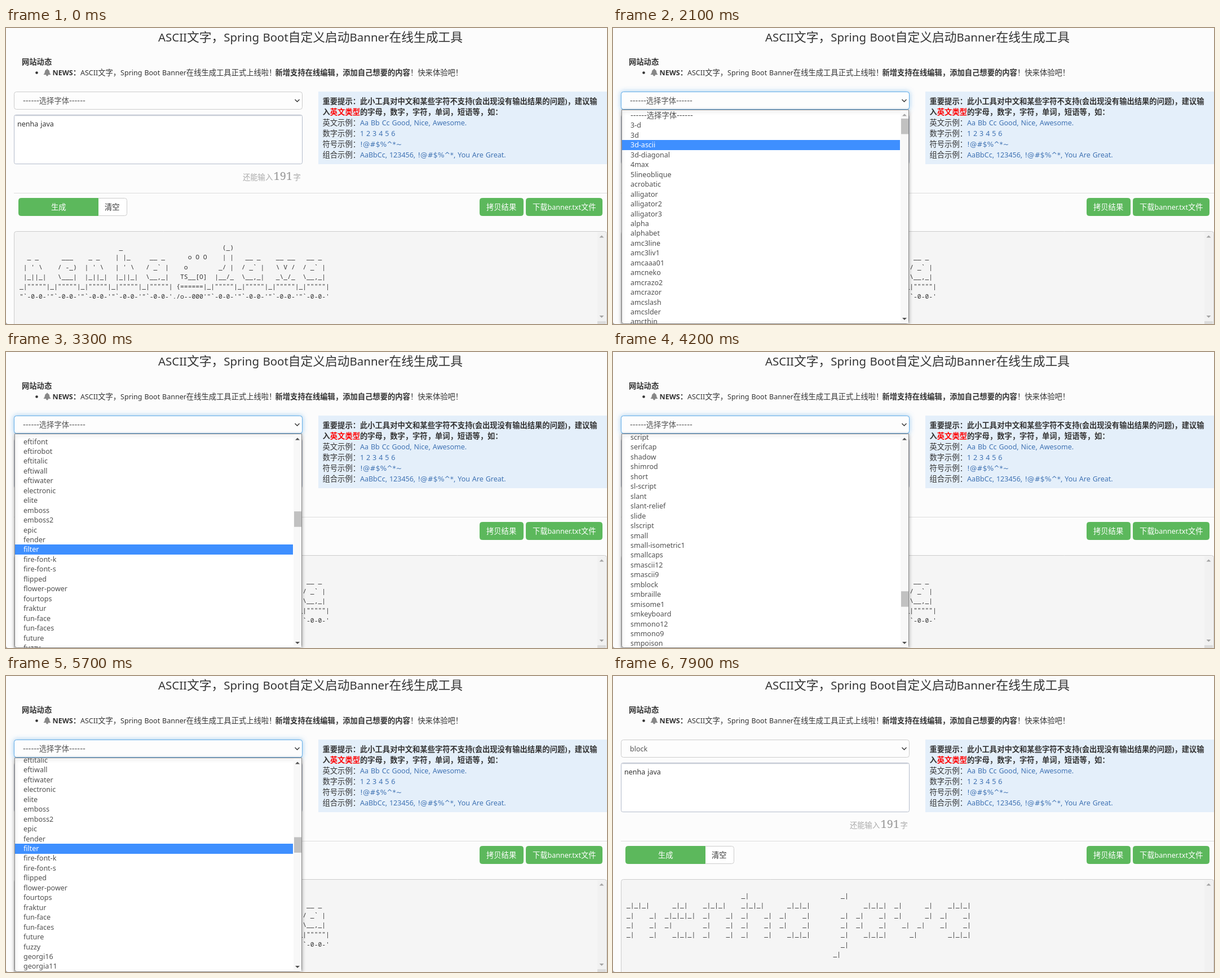
Write an HTML page with a canvas that moves like this. It is 1066 px wide and 526 px high and loops after 8000 ms.

```html
<!DOCTYPE html>
<html lang="zh-CN">
<head>
<meta charset="utf-8">
<title>Banner</title>
<style>
html, body { margin: 0; width: 100%; height: 100%; overflow: hidden; background: #fcfcfc; }
canvas { display: block; }
</style>
</head>
<body>
<canvas id="stage" width="1066" height="526"></canvas>
<script>
const ctx = document.getElementById('stage').getContext('2d');
const LOOP = 8000, STEP = 100, SIZE = 13.3;
const INK = '#333', LINK = '#3f72b3', GREEN = '#5cb85c', GREEN_HOVER = '#449d44';
const NAME = 'nenha java';
const PROMPT = '------选择字体------';

const fonts = [PROMPT, ...`3-d 3d 3d-ascii 3d-diagonal 4max 5lineoblique acrobatic alligator alligator2
alligator3 alpha alphabet amc3line amc3liv1 amcaaa01 amcneko amcrazo2 amcrazor amcslash amcslder amcthin
amctubes amcun1 arrows ascii-new-roman avatar b1ff banner banner3 banner3-d banner4 barbwire basic bear bell
benjamin big big-money-ne big-money-nw big-money-se big-money-sw bigascii12 bigascii9 bigchief bigfig bigmono12
bigmono9 block blocks bloody bolger braced bright broadway broadway-kb bubble bulbhead calgphy2 caligraphy
calvin-s cards catwalk chiseled chunky circle coinstak cola colossal computer contessa contrast cosmike
crawford crawford2 crazy cricket cursive cyberlarge cybermedium cybersmall cygnet danc4 dancing-font decimal
delta-corps diamond diet-cola digital doh doom dos-rebel dot-matrix double double-shorts dwhistled eftichess
eftifont eftirobot eftitalic eftiwall eftiwater electronic elite emboss emboss2 epic fender filter fire-font-k
fire-font-s flipped flower-power fourtops fraktur fun-face fun-faces future fuzzy georgi16 georgia11 ghost
ghoulish glenyn goofy gothic graceful gradient graffiti greek heart-left heart-right hex hieroglyphs
horizontal-left horizontal-right icl-1900 impossible invita isometric1 isometric2 isometric3 isometric4 italic
ivrit jacky jazmine js-block-letters js-cursive js-stick-letters katakana kban keyboard knob konto konto-slant
lcd lean letters line-blocks linux madrid marquee maxfour merlin1 merlin2 mini mirror mnemonic modular morse
morse2 moscow muzzle nscript ntgreek nvscript o8 octal ogre old-banner os2 pagga pawp peaks peaks-slant pebbles
pepper poison puffy puzzle pyramid rectangles relief relief2 reverse roman rot13 rotated rounded rowancap rozzo
runic runyc s-blood sans-block sans-line sans-mono sans-thin script serifcap shadow shimrod short sl-script
slant slant-relief slide slscript small small-isometric1 smallcaps smascii12 smascii9 smblock smbraille smisome1
smkeyboard smmono12 smmono9 smpoison smscript smshadow smslant smtengwar soft speed spliff stampate stampatello
standard star-strips stellar stforek stick-letters stop straight sub-zero swamp-land swan sweet tengwar term
test1 thick thin this three-point ticks ticks-slant tiles times tinker-toy tombstone train tsalagi tubular
twisted two-point univers varsity wavy weird wet-letter whimsy wow`.split(/\s+/)];

const ROW = 17.45, FIRST = 155.5, TOP = 145, BOTTOM = 525;
const maxScroll = fonts.length * ROW - (BOTTOM - TOP);
const scrollFor = (name, y) => FIRST + fonts.indexOf(name) * ROW - y;
const rowAt = (y, scroll) => Math.round((y + scroll - FIRST) / ROW);

// [start, end, scroll reached]: each burst moves in equal 100 ms steps
const MID = scrollFor('eftifont', 159), LOW = scrollFor('script', 151.5), BACK = scrollFor('filter', 306.5);
const bursts = [
  [2600, 2700, MID / 3], [2900, 3000, MID * 2 / 3], [3200, 3300, MID],
  [3500, 4000, LOW - 260], [4200, 4200, LOW], [4300, 4400, maxScroll],
  [5100, 5200, maxScroll - 1000], [5400, 5500, BACK + 560],
  [5700, 5700, BACK], [5800, 5800, BACK - 280],
  [6200, 6500, scrollFor('bloody', 331.5)]
];

function scrollAt(t) {
  let pos = 0;
  for (const [start, end, to] of bursts) {
    if (t < start) break;
    const k = Math.min(1, (t - start + STEP) / (end - start + STEP));
    pos += (to - pos) * k;
  }
  return pos;
}

function activeRow(t, scroll) {
  if (t < 2100) return 0;
  if (t < 2200) return 3;
  if (t < 2300) return 8;
  if (t < 2600) return 11;
  if (t < 3300) return rowAt(350, scroll);
  if (t < 6200) return fonts.indexOf('filter');
  if (t < 6700) return rowAt(331, scroll);
  return fonts.indexOf(t < 6800 ? 'blocks' : 'block');
}

const train = {
  a: ['        ', '  __ _  ', ' / _` | ', ' \\__,_| '],
  e: ['        ', '   ___  ', '  / -_) ', '  \\___| '],
  h: ['  _     ', ' | |_   ', " | ' \\  ", ' |_||_| '],
  j: ['    (_) ', '    | | ', '   _/ | ', '  |__/_ '],
  n: ['        ', '  _ _   ', " | ' \\  ", ' |_||_| '],
  v: ['        ', '  __ __ ', '  \\ V / ', '  _\\_/_ '],
  ' ': ['         ', '    o O O', '   o     ', '  TS__[O]']
};
const block = {
  a: '.... .### #..# #..# .### .... ....',
  e: '.... .##. #### #... .### .... ....',
  h: '#... ###. #..# #..# #..# .... ....',
  j: '.# .. .# .# .# .# #.',
  n: '.... ###. #..# #..# #..# .... ....',
  v: '..... #...# #...# .#.#. ..#.. ..... .....',
  ' ': '. . . . . . .'
};
const rows = (n, cell, gap = '') =>
  Array.from({ length: n }, (_, r) => [...NAME].map(c => cell(c, r)).join(gap));
const trainArt = rows(6, (c, r) => {
  if (r < 4) return train[c][r];
  if (c === ' ') return r === 4 ? ' {======|' : "./o--000'";
  return r === 4 ? '_|"""""|' : "\"`-0-0-'";
});
const blockArt = rows(7, (c, r) => block[c].split(' ')[r], '.')
  .map(s => s.replace(/\./g, '  ').replace(/#/g, '_|'));

// Each kind of run gets its own face and relative size
const RUNS = /-{3,}|[!@#$%^*~]{3,}|[\u2e80-\uffef]+|(?:(?!-{3}|[!@#$%^*~]{3})[^\u2e80-\uffef])+/g;
function face(run) {
  if (run.startsWith('---')) return ['"DejaVu Sans"', 1];
  if (/^[!@#$%^*~]{3}/.test(run)) return ['"DejaVu Sans"', 0.93];
  return run[0] >= '\u2e80' ? ['"Noto Sans CJK SC", "Noto Sans CJK"', 1] : ['"Noto Sans"', 0.94];
}

// Returns the end x
function text(str, x, y, color = INK, size = SIZE, weight = 400) {
  ctx.save();
  ctx.fillStyle = color;
  ctx.wordSpacing = `${size * 0.05}px`;
  for (const run of str.match(RUNS)) {
    const [family, scale] = face(run);
    ctx.font = `${weight} ${size * scale}px ${family}, sans-serif`;
    ctx.fillText(run, x, y);
    x += ctx.measureText(run).width;
  }
  ctx.restore();
  return x;
}
const bold = (str, x, y, color) => text(str, x, y, color, SIZE, 700);

function box(x, y, w, h, r, fill, stroke) {
  ctx.beginPath();
  ctx.roundRect(x + 0.5, y + 0.5, w - 1, h - 1, r);
  ctx.fillStyle = fill;
  ctx.fill();
  ctx.strokeStyle = stroke;
  ctx.lineWidth = 1;
  ctx.stroke();
}

function rect(x, y, w, h, fill) {
  ctx.fillStyle = fill;
  ctx.fillRect(x, y, w, h);
}

function arrow(x, y, dir, color) {
  ctx.fillStyle = color;
  ctx.beginPath();
  ctx.moveTo(x - 4, y + 2 * dir);
  ctx.lineTo(x + 4, y + 2 * dir);
  ctx.lineTo(x, y - 2 * dir);
  ctx.fill();
}

function bell(x, y) {
  ctx.fillStyle = '#888';
  ctx.beginPath();
  ctx.moveTo(x - 6.5, y + 3.5);
  ctx.quadraticCurveTo(x - 4, y + 1, x - 4, y - 2);
  ctx.bezierCurveTo(x - 4, y - 7, x + 4, y - 7, x + 4, y - 2);
  ctx.quadraticCurveTo(x + 4, y + 1, x + 6.5, y + 3.5);
  ctx.fill();
  ctx.beginPath();
  ctx.arc(x, y + 4, 2, 0, Math.PI);
  ctx.arc(x, y - 6, 1, 0, Math.PI * 2);
  ctx.fill();
}

function header() {
  text('ASCII文字，Spring Boot自定义启动Banner在线生成工具', 270, 24, INK, 21.75);
  bold('网站动态', 28, 65);
  ctx.fillStyle = INK;
  ctx.beginPath();
  ctx.arc(54.5, 79.5, 2.3, 0, Math.PI * 2);
  ctx.fill();
  bell(73, 79.5);
  bold('NEWS：', 82.5, 84);
  text('ASCII文字，Spring Boot Banner在线生成工具正式上线啦！', 132, 84);
  bold('新增支持在线编辑，添加自己想要的内容', 477.5, 84);
  text('！快来体验吧！', 717, 84);
}

function tips() {
  rect(554, 113, 512, 129, '#e4effa');
  bold('重要提示：此小工具对中文和某些字符不支持(会出现没有输出结果的问题)，建议输', 561.5, 135);
  let x = bold('入', 561.5, 154);
  x = bold('英文类型', x, 154, '#f00');
  bold('的字母，数字，字符，单词，短语等，如：', x, 154);
  [['英文', 'Aa Bb Cc Good, Nice, Awesome.'], ['数字', '1 2 3 4 5 6'],
   ['符号', '!@#$%^*~'], ['组合', 'AaBbCc, 123456, !@#$%^*, You Are Great.']
  ].forEach(([kind, sample], i) => {
    const y = 173 + i * 19;
    text(sample, text(kind + '示例：', 561.5, y), y, LINK);
  });
}

function selectBox(value, glow) {
  if (glow) {
    ctx.save();
    ctx.shadowColor = `rgba(102,175,233,${0.6 * glow})`;
    ctx.shadowBlur = 8;
    box(14, 113, 512, 32, 4, '#fff', '#66afe9');
    ctx.restore();
  }
  box(14, 113, 512, 32, 4, '#fdfdfd', glow ? '#66afe9' : '#ccc');
  text(value, 30, 134, '#555');
  ctx.strokeStyle = '#333';
  ctx.lineWidth = 1.4;
  ctx.beginPath();
  ctx.moveTo(512.5, 127);
  ctx.lineTo(516.5, 131);
  ctx.lineTo(520.5, 127);
  ctx.stroke();
}

function form(hoverMake, hoverClear) {
  box(14, 154, 512, 88, 3, '#fff', '#b4bccb');
  rect(16, 155, 508, 1, '#d5d8de');
  rect(16, 156, 508, 1, '#eceef1');
  text(NAME, 20, 174.5);
  text('还能输入', 420, 270, '#aaa');
  ctx.font = '20px "Noto Serif", serif';
  ctx.fillStyle = '#999';
  ctx.fillText('191', 474.5, 270);
  text('字', 509.5, 270, '#aaa');

  rect(14, 293, 1052, 1, '#ddd');
  box(160, 302, 55, 32, 4, hoverClear ? '#e6e6e6' : '#fff', hoverClear ? '#adadad' : '#ccc');
  const green = (x, w, r, fill = GREEN) => box(x, 302, w, 32, r, fill, fill);
  green(22, 142, [4, 0, 0, 4], hoverMake ? GREEN_HOVER : GREEN);
  green(840, 78, 4);
  green(922, 136, 4);
  text('生成', 80, 323, '#fff');
  text('清空', 175, 323);
  text('拷贝结果', 852, 323, '#fff');
  text('下载banner.txt文件', 934, 323, '#fff');
}

function output(art, short) {
  box(14, 361, 1052, 190, 4, '#f5f5f5', '#ccc');
  rect(1049, 363, 15, 163, '#f1f1f1');
  arrow(1056.5, 370.5, 1, '#a3a3a3');
  if (short) {
    arrow(1056.5, 513, -1, '#a3a3a3');
    rect(1049, 521, 15, 5, '#dcdcdc');
  }
  ctx.font = '11.32px "Noto Sans Mono", monospace';
  ctx.fillStyle = INK;
  art.forEach((line, i) => ctx.fillText(line, 24, 394 + i * 17.35));
}

function dropdown(t) {
  const scroll = scrollAt(t), active = activeRow(t, scroll);
  ctx.save();
  ctx.shadowColor = 'rgba(0,0,0,.35)';
  ctx.shadowBlur = 6;
  ctx.shadowOffsetY = 2;
  box(15, TOP, 510, BOTTOM - TOP + 1, [0, 0, 4, 4], '#fff', '#8a8a8a');
  ctx.restore();

  ctx.save();
  ctx.beginPath();
  ctx.rect(16, TOP + 1, 508, BOTTOM - TOP - 1);
  ctx.clip();
  const from = Math.max(0, Math.floor(scroll / ROW) - 1);
  for (let i = from; i < Math.min(fonts.length, from + 25); i++) {
    const y = FIRST + i * ROW - scroll;
    if (i === active) rect(16, Math.round(y - 9), 493, 18, '#3e8fff');
    text(fonts[i], 31, y + 4.5, i === active ? '#fff' : '#505050');
  }
  rect(510, TOP, 15, BOTTOM - TOP, '#f8f8f8');
  rect(511, 161 + scroll / maxScroll * 321, 13, 27.5, '#c1c1c1');
  arrow(517, 154.5, 1, scroll > 0 ? '#505050' : '#a3a3a3');
  arrow(517, 517, -1, scroll < maxScroll - 1 ? '#505050' : '#a3a3a3');
  ctx.restore();
}

function draw(t) {
  const within = (a, b) => t >= a && t < b;
  const done = t >= 7700;
  const glow = within(1700, 7600) ? (t < 1800 ? 0.5 : 1) : 0;
  rect(0, 0, 1066, 526, '#fcfcfc');
  header();
  tips();
  selectBox(t >= 7100 ? 'block' : PROMPT, glow);
  form(within(500, 900) || within(7300, 7800), within(400, 500));
  output(done ? blockArt : trainArt, !done);
  if (within(1700, 7100)) dropdown(t);
  ctx.fillStyle = '#999';
  ctx.beginPath();
  ctx.moveTo(0, 522);
  ctx.quadraticCurveTo(0, 526, 4, 526);
  ctx.lineTo(0, 526);
  ctx.fill();
}

let shown = -1;
function tick() {
  const t = Math.floor(performance.now() % LOOP / STEP) * STEP;
  if (t !== shown) draw(shown = t);
  requestAnimationFrame(tick);
}
tick();
</script>
</body>
</html>
```
